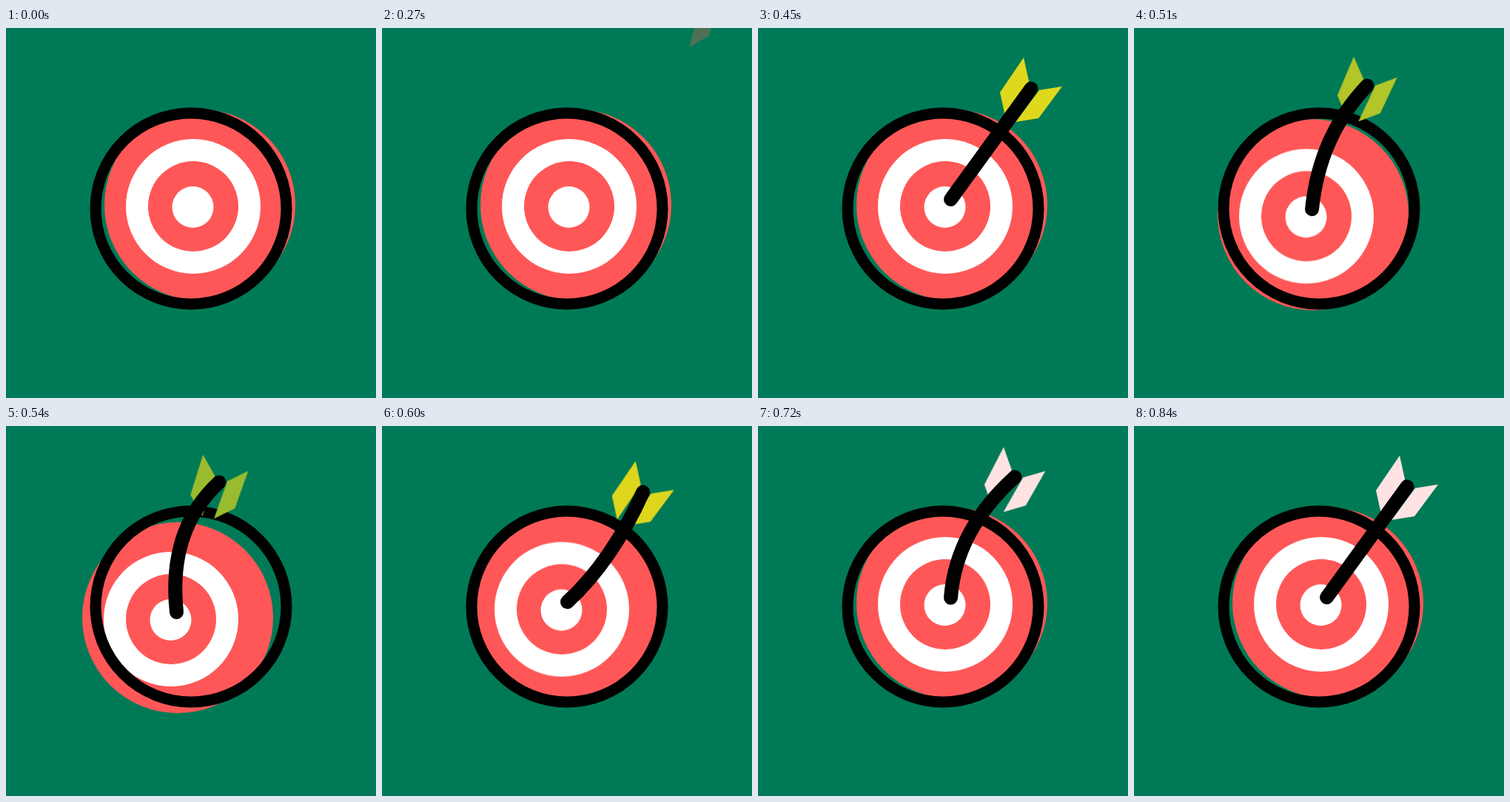
These frames come from a looping animation (500x500 px, 6.33 s). An HTML page without scripts:

```html
<!DOCTYPE html>
<html lang="en">
<head>
<meta charset="utf-8">
<title>Arrow hits the target</title>
<style>
  html, body { margin: 0; width: 100%; height: 100%; overflow: hidden; background: #007a56; }
  svg { display: block; width: 100%; height: 100%; }

  .disc, .shaft, .vanes, .late { animation: 6330ms step-end infinite; }
  .disc { animation-name: recoil; }
  .shaft { animation-name: bend; fill: none; stroke: #000; stroke-width: 19; stroke-linecap: round; }
  .vanes { animation-name: swing; }
  .late { animation-name: appear; }

  /* Every step lasts 30 ms */
  @keyframes recoil {
    0% { transform: translate(0, 0); }
    7.108% { transform: translate(0, 0); animation-timing-function: steps(3); }
    8.53% { transform: translate(-30px, 20px); animation-timing-function: steps(3); }
    9.952%, 100% { transform: translate(0, 0); }
  }

  /* Shaft runs from the nock to the tip */
  @keyframes bend {
    0% { d: path("M420 -200Q420 -200 420 -200"); }
    4.265% { d: path("M418.5 -23.5Q418.5 -23.5 418.5 -23.5"); animation-timing-function: steps(2); }
    5.213% { d: path("M427 2Q372.5 77 318 152"); animation-timing-function: steps(4); }
    7.108% { d: path("M369 82Q314.5 157 260.5 231.5"); animation-timing-function: steps(3); }
    8.53% { d: path("M288 76Q218.5 140 230.5 251.5"); animation-timing-function: steps(3); }
    9.952% { d: path("M385 96Q357.5 202.5 260.5 231"); animation-timing-function: steps(3); }
    11.374% { d: path("M347 69Q267.5 141 260.5 232"); animation-timing-function: steps(4); }
    13.27%, 100% { d: path("M369 82Q314.5 157 260.5 231.5"); }
  }

  @keyframes swing {
    0% { transform: translate(420px, -200px) rotate(0deg); fill: #4e7156; }
    4.265% { transform: translate(418.5px, -23.5px) rotate(-21deg); fill: #4e7156; animation-timing-function: steps(2); }
    5.213% { transform: translate(427px, 2px) rotate(0deg); fill: #7e9443; animation-timing-function: steps(4); }
    7.108% { transform: translate(369px, 82px) rotate(0deg); fill: #dfd91e; animation-timing-function: steps(3); }
    8.53% { transform: translate(288px, 76px) rotate(-17deg); fill: #9bbb2e; animation-timing-function: steps(3); }
    9.952% { transform: translate(385px, 96px) rotate(8.5deg); fill: #ffe414; animation-timing-function: steps(3); }
    11.374% { transform: translate(347px, 69px) rotate(-7deg); fill: #ffe3e3; animation-timing-function: steps(4); }
    13.27%, 100% { transform: translate(369px, 82px) rotate(0deg); fill: #ffe3e3; }
  }

  @keyframes appear {
    0% { opacity: 0; }
    4.739%, 100% { opacity: 1; }
  }
</style>
</head>
<body>
<svg viewBox="0 0 500 500">
  <g class="disc">
    <circle cx="262" cy="239" r="129" fill="#ff5757"/>
    <circle cx="253" cy="241" r="91" fill="#fff"/>
    <circle cx="253" cy="241" r="61" fill="#ff5757"/>
    <circle cx="252.5" cy="242" r="28" fill="#fff"/>
  </g>
  <circle cx="250" cy="244" r="129" fill="none" stroke="#000" stroke-width="15"/>
  <g class="vanes">
    <path class="late" d="M-10-42L-42 5L-35 37L-3-10Z"/>
    <path d="M42-3L10 40L-21 45L11 2Z"/>
  </g>
  <path class="shaft" d="M420 -200Q420 -200 420 -200"/>
</svg>
</body>
</html>
```
